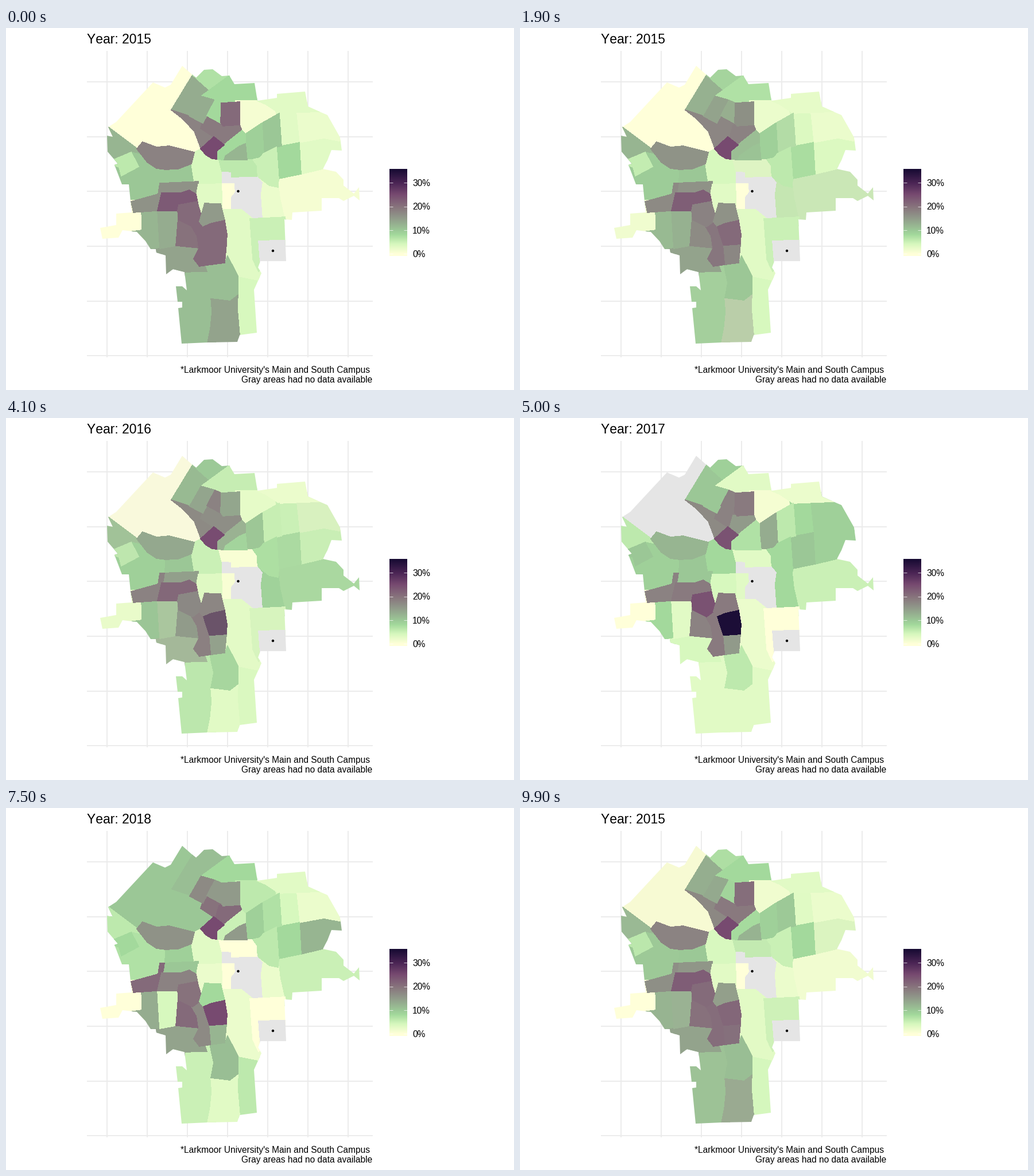
Recreate the animation shown at these times as a matplotlib script. Size 885 by 632 pixels, loop 10 s.

```python
import numpy as np
import matplotlib.pyplot as plt
from matplotlib.animation import FuncAnimation
from matplotlib.colors import to_rgb
from matplotlib.patches import Circle, Polygon

W, H, DPI = 885, 632, 100
PT = 72 / DPI          # points per pixel
HOLD, MOVE = 13, 12    # frames a year rests, frames it blends into the next
YEARS = [2015, 2016, 2017, 2018]
NO_DATA = np.array(to_rgb("#e5e5e5"))

LEVELS = [0, 4, 8, 10, 15, 20, 25, 30, 35.6]
SHADES = np.array([to_rgb(c) for c in (
    "#ffffd9", "#d7f8be", "#a3d99c", "#9bc796", "#919a8a",
    "#87727c", "#774a70", "#4a2454", "#170b33")])

plt.rcParams["text.kerning_factor"] = 6   # no kerning


def shade(v):
    if v is None:
        return NO_DATA
    return np.array([np.interp(v, LEVELS, SHADES[:, i]) for i in range(3)])


fig = plt.figure(figsize=(W / DPI, H / DPI), dpi=DPI, facecolor="white")
ax = fig.add_axes([0, 0, 1, 1])
ax.axis("off")

# city limits, clockwise from the northern tip
EAST = [307, 66, 325, 82, 331, 87, 345, 73, 360, 72, 376, 84, 389, 83, 398, 98,
        433, 96, 438, 127, 472, 122, 472, 115, 521, 111, 526, 137, 546, 146,
        560, 152, 582, 191, 585, 214, 567, 213, 560, 231, 552, 246, 575, 251,
        588, 265, 588, 275, 606, 289, 615, 278, 616, 301, 606, 293, 588, 302,
        580, 297, 550, 297, 550, 319, 499, 322, 498, 335, 485, 334, 488, 407,
        443, 407, 439, 418, 445, 428, 432, 457, 437, 532, 407, 536, 403, 548]
WEST = [351, 549, 306, 551, 300, 489, 307, 488, 307, 478, 299, 478, 296, 451,
        307, 451, 315, 458, 311, 426, 291, 421, 279, 430, 278, 397, 262, 392,
        261, 386, 252, 386, 243, 372, 228, 356, 203, 353, 196, 366, 168, 368,
        164, 349, 192, 344, 192, 324, 219, 322, 214, 273, 202, 273, 189, 239,
        195, 237, 177, 216, 176, 188, 186, 190, 178, 173, 192, 164, 256, 95,
        277, 104, 287, 99]
limits = Polygon(np.reshape(EAST + WEST, (-1, 2)), transform=ax.transData)
areas = []


def area(rates, *xy):
    """Lay a district over the earlier ones, cut at the city limits."""
    patch = Polygon(np.reshape(xy, (-1, 2)), lw=0.4, zorder=2, antialiased=False)
    ax.add_patch(patch)
    patch.set_clip_path(limits)
    areas.append((patch, [shade(v) for v in rates]))


def label(x, y, text, size=15.5, ha="left"):
    return ax.text(x, y, text, fontsize=size * PT, family="Liberation Sans",
                   ha=ha, va="baseline", color="black")


def line(x, y, color, width, z):
    ax.plot(x, y, color=color, lw=width * PT, solid_capstyle="butt", zorder=z)


for i in range(7):
    line([176 + 70 * i] * 2, [40, 575], "#ebebeb", 1.85, 1)
for i in range(6):
    line([141, 639], [94 + 95.65 * i] * 2, "#ebebeb", 1.85, 1)

# north-west
area((0, 0, None, 10), 160, 170, 250, 60, 325, 60, 350, 140, 345, 220, 220, 220)
area((12, 12, 6, 6), 165, 163, 229, 211, 245, 230, 170, 245)
area((10, 9, 9, 7), 185, 231, 218, 217, 240, 222, 290, 250, 280, 300, 190, 320)
area((6, 5, 10, 8), 180, 233, 218, 217, 231, 242, 201, 258, 197, 243, 180, 236)
area((10, 10, 10, 9), 278, 240, 330, 230, 340, 270, 277, 271)
area((4, 4, 8, 3), 328, 217, 340, 211, 378, 228, 378, 280, 330, 280, 323, 237)
area((18, 14, 12, 16), 238, 199, 262, 208, 284, 206, 328, 217, 323, 237,
     300, 246, 278, 247, 262, 245, 246, 234, 228, 211)
area((16, 16, 10, 10), 268, 271, 335, 268, 336, 282, 331, 290, 265, 300)

# north
area((13, 12, 10, 11), 325, 82, 354, 108, 340, 119, 320, 154, 288, 143)
area((7, 10, 9, 11), 325, 60, 390, 60, 392, 83, 354, 108, 325, 82)
area((8, 6, 3, 8), 340, 119, 389, 83, 400, 70, 440, 80, 438, 127, 375, 131)
area((1, 3, 1, 6), 400, 127, 438, 127, 452, 133, 476, 149, 446, 166, 417, 186,
     405, 180)
area((18, 17, 17, 10), 288, 143, 320, 154, 345, 166, 365, 190, 339, 209,
     328, 180, 306, 157)
area((19, 16, 18, 20), 350, 153, 378, 168, 367, 194, 339, 175, 343, 164)
area((19, 17, 15, 21), 371, 170, 407, 169, 411, 179, 380, 204, 365, 192)
area((13, 15, 10, 17), 340, 119, 364, 126, 343, 166, 320, 154)
area((8, 18, 18, 15), 364, 126, 375, 131, 374, 166, 350, 153)
area((21, 12, 19, 15), 375, 131, 407, 129, 407, 169, 378, 171, 374, 165)

# east
area((1, 9, 5, 5), 470, 240, 630, 240, 630, 345, 480, 345)
area((3, 4, 9, 12), 511, 200, 554, 192, 600, 200, 600, 225, 548, 247, 514, 255)
area((2, 2, 9, 2), 500, 130, 600, 130, 600, 201, 554, 192, 511, 200)
area((3, 4, 8, 4), 470, 145, 505, 145, 511, 200, 480, 206)
area((3, 2, 2, 3), 438, 127, 470, 100, 540, 100, 546, 146, 476, 149, 452, 133)
area((8, 7, 10, 8), 471, 206, 480, 206, 511, 200, 514, 255, 475, 263)
area((10, 5, 6, 7), 446, 166, 476, 149, 480, 206, 471, 208, 449, 219)
area((9, 9, 13, 9), 417, 185, 446, 166, 449, 219, 442, 227, 420, 231)
area((2, 9, 8, 2), 440, 262, 474, 270, 477, 297, 485, 332, 444, 332)
area((5, 7, 8, 6), 428, 230, 442, 227, 449, 219, 471, 208, 475, 263, 474, 278,
     459, 275, 437, 258)

# centre
area((None,) * 4, 377, 250, 393, 250, 393, 259, 437, 259, 446, 270, 443, 290,
     446, 331, 425, 333, 410, 317, 377, 316)
area((6, 0, 3, 0), 371, 230, 428, 230, 436, 241, 437, 259, 393, 260, 393, 251,
     376, 250)
area((12, 9, 7, 15), 417, 200, 420, 230, 378, 230, 381, 222, 405, 205)
area((8, 14, 7, 5), 411, 179, 417, 185, 417, 200, 405, 205, 381, 222, 378, 230,
     365, 229, 367, 215, 380, 204)
area((25, 25, 24, 25), 362, 190, 380, 204, 367, 215, 367, 229, 359, 228, 349, 222,
     339, 211)
area((3, 3, 4, 2), 335, 273, 377, 272, 380, 312, 340, 324, 332, 290)

# south
area((4, 4, 3, 6), 400, 430, 445, 435, 440, 540, 400, 540)
area((3, 3, 2, 2), 370, 316, 410, 317, 430, 333, 450, 428, 439, 440, 404, 433,
     370, 400)
area((0, 0, 3, 0), 377, 272, 397, 272, 398, 286, 391, 295, 391, 315, 378, 315)
area((5, 5, 0, 0), 425, 333, 486, 330, 495, 370, 440, 425, 430, 404)
area((None,) * 4, 440, 372, 495, 370, 495, 410, 443, 410)
area((11, 7, 3, 5), 290, 410, 365, 410, 365, 560, 290, 560)
area((14, 3, 3, 3), 357, 471, 404, 464, 403, 490, 407, 536, 403, 560, 349, 560,
     356, 525, 359, 495)
area((11, 9, 6, 11), 355, 413, 381, 410, 386, 398, 404, 433, 404, 464, 390, 475,
     357, 471, 362, 445)

# south-west
area((0, 3, 0, 0), 150, 300, 240, 300, 240, 380, 150, 380)
area((12, 11, 8, 13), 236, 315, 270, 315, 270, 395, 220, 395, 220, 355, 237, 353)
area((14, 14, 4, 14), 255, 387, 296, 380, 336, 384, 350, 425, 311, 426, 311, 440,
     260, 440)
area((13, 12, 3, 4), 264, 319, 299, 319, 301, 335, 296, 380, 268, 385)
area((16, 18, 18, 21), 218, 303, 265, 290, 268, 271, 276, 271, 274, 284,
     264, 319, 222, 322)
area((23, 22, 19, 18), 271, 288, 304, 288, 319, 283, 331, 290, 335, 310,
     300, 319, 264, 319)
area((20, 14, 18, 21), 300, 330, 325, 345, 333, 363, 336, 384, 296, 380)
area((21, 18, 19, 17), 323, 346, 337, 338, 350, 345, 358, 413, 337, 416,
     327, 403, 336, 385, 333, 363)
area((21, 15, 24, 20), 301, 309, 333, 303, 341, 330, 337, 338, 325, 347,
     301, 335, 299, 319)
area((15, 17, 19, 8), 346, 306, 374, 307, 381, 336, 358, 341, 344, 347,
     337, 338, 341, 324)
area((21, 21, 35, 25), 344, 347, 358, 341, 381, 336, 385, 360, 384, 379, 355, 381)
area((21, 14, 15, 12), 355, 381, 384, 379, 381, 410, 358, 413)

for spot in [(404.5, 285), (465, 389)]:
    ax.add_patch(Circle(spot, 2.2, color="black", lw=0, zorder=3))

# legend
TOP, BOTTOM, ZERO, STEP = 246.5, 398, 394.3, 41.4
rows = np.linspace(TOP, BOTTOM, 152)
ramp = np.array([[shade((ZERO - y) / STEP * 10)] for y in rows])
ax.imshow(ramp, extent=[668, 699, BOTTOM, TOP], aspect="auto",
          interpolation="bilinear", zorder=2)
for i in range(4):
    y = ZERO - STEP * i
    for x in (668, 692.8):
        line([x, x + 6.2], [y, y], "white", 0.7, 3)
    label(708, y + 5.6, f"{10 * i}%")

title = label(141, 27, "", 22.9)
label(634.5, 602.3, "*Larkmoor University's Main and South Campus", ha="right")
label(638.7, 619, "Gray areas had no data available", ha="right")

ax.set_xlim(0, W)
ax.set_ylim(H, 0)


def update(k):
    now, step = divmod(k, HOLD + MOVE)
    nxt = (now + 1) % len(YEARS)
    mix = max(0, step - HOLD) / MOVE
    for patch, colors in areas:
        patch.set_color((1 - mix) * colors[now] + mix * colors[nxt])
    title.set_text(f"Year: {YEARS[nxt if mix > 0.5 else now]}")
    return [title] + [patch for patch, _ in areas]


anim = FuncAnimation(fig, update, frames=len(YEARS) * (HOLD + MOVE), interval=100,
                     repeat=True, repeat_delay=0, blit=False)
plt.show()
```
